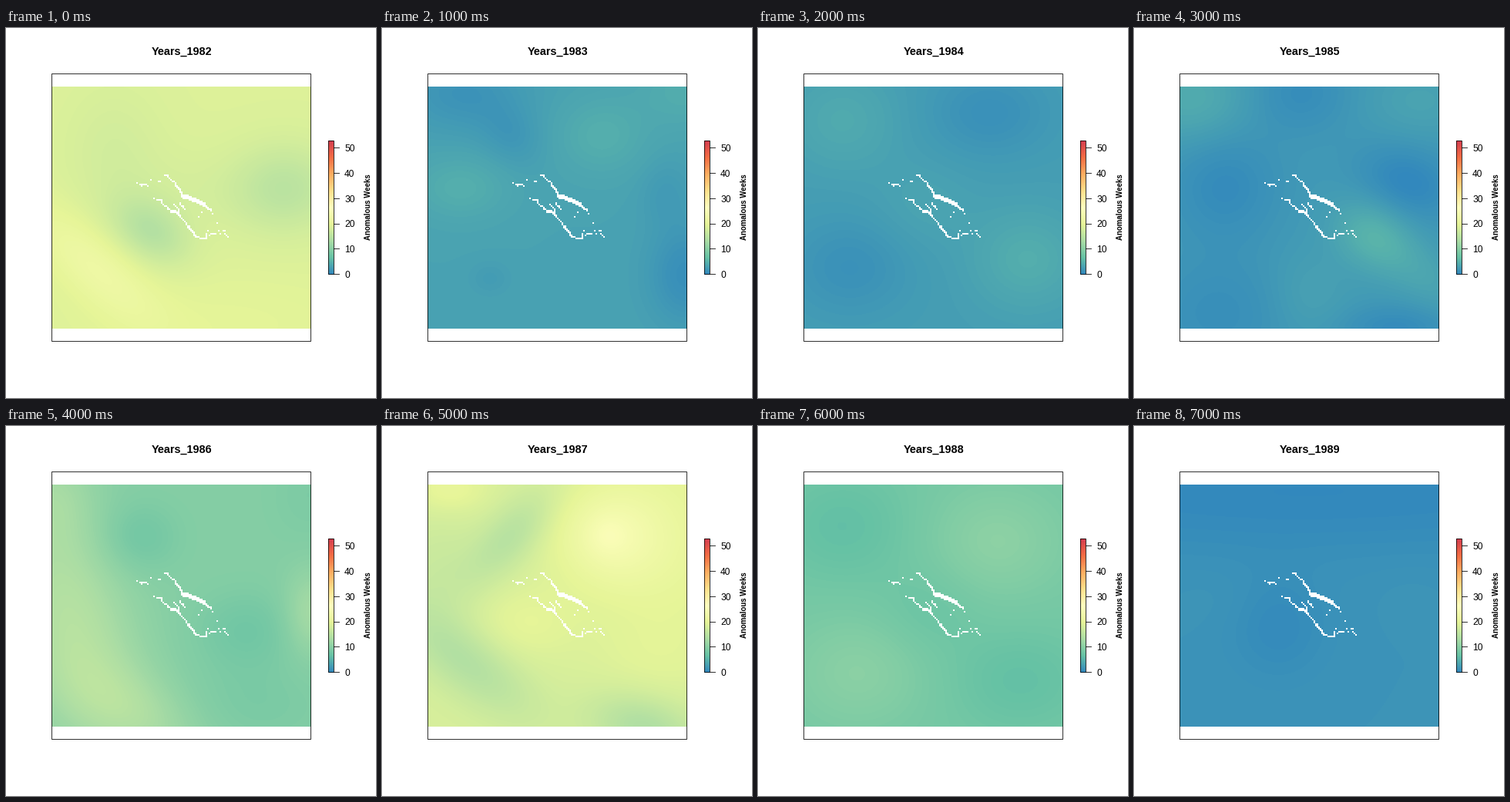
A matplotlib script for the animation above (8 s loop, 480 by 480 pixels).

```python
import numpy as np
import matplotlib.pyplot as plt
from matplotlib.animation import FuncAnimation
from matplotlib.colors import LinearSegmentedColormap
from matplotlib.patches import Rectangle

DPI = 72
SIZE = 480
LEFT, RIGHT, TOP, BOTTOM = 59, 396, 76, 390
MAX_WEEKS = 53
FIRST_YEAR = 1982

palette = LinearSegmentedColormap.from_list("weeks", [
    "#3288BD", "#66C2A5", "#ABDDA4", "#E6F598", "#FFFFBF",
    "#FEE08B", "#FDAE61", "#F46D43", "#D53E4F"], N=256)

X, Y = np.meshgrid(np.arange(LEFT, RIGHT) + 0.5, np.arange(TOP, BOTTOM) + 0.5)


def bump(x, y, rx, ry, height, tilt=0):
    """Tilted Gaussian hill; tilt in degrees, clockwise on screen."""
    c, s = np.cos(np.radians(tilt)), np.sin(np.radians(tilt))
    u = ((X - x) * c + (Y - y) * s) / rx
    v = ((Y - y) * c - (X - x) * s) / ry
    return height * np.exp(-(u * u + v * v) / 2)


# Weeks per year: a base level plus hills and hollows
fields = [
    18.9 + bump(188, 264, 38, 26, -4.2, 35) + bump(362, 208, 48, 40, -3.8)
    + bump(115, 310, 75, 28, 3.1, 42) + bump(140, 160, 45, 60, -1.3)
    + bump(280, 385, 130, 45, 0.9) + bump(235, 215, 60, 40, -0.8),

    3.1 + bump(105, 85, 55, 35, -1.7) + bump(168, 140, 30, 25, -1.2, 45)
    + bump(285, 140, 42, 36, 1.4) + bump(102, 207, 44, 30, 1.4)
    + bump(394, 320, 34, 45, -2.2) + bump(140, 325, 18, 15, -0.7)
    + bump(395, 80, 45, 35, 1.2) + bump(368, 215, 22, 30, -0.9),

    2.6 + bump(110, 120, 50, 45, 1.4) + bump(300, 110, 55, 40, -1.5)
    + bump(350, 300, 50, 45, 1.8) + bump(120, 310, 55, 45, -1.4)
    + bump(215, 230, 45, 40, 0.7),

    2.1 + bump(75, 92, 52, 40, 2.1) + bump(215, 85, 45, 35, -1.4)
    + bump(370, 95, 50, 35, 1.1) + bump(118, 205, 48, 50, -1.6)
    + bump(355, 200, 45, 32, -2.1, 20) + bump(310, 270, 38, 30, 2.8, 35)
    + bump(375, 320, 45, 25, 1.2, 40) + bump(340, 388, 50, 20, -1.6)
    + bump(110, 370, 60, 50, -1.2) + bump(230, 345, 35, 40, 0.9),

    9.7 + bump(85, 255, 55, 110, 4.8, -15) + bump(165, 370, 70, 38, 3.2, 30)
    + bump(398, 243, 25, 38, 3.3) + bump(312, 265, 45, 35, -1.9)
    + bump(172, 145, 35, 32, -2) + bump(65, 90, 35, 45, 2)
    + bump(320, 360, 70, 40, -1) + bump(392, 90, 35, 45, -0.8),

    18.2 + bump(293, 142, 48, 46, 4.6) + bump(293, 142, 16, 16, 1.2)
    + bump(370, 150, 65, 95, 2.3)
    + bump(88, 82, 32, 20, 2.4) + bump(168, 142, 52, 24, -3.5, -48)
    + bump(108, 305, 75, 30, -4, 38) + bump(187, 255, 45, 32, 1.7)
    + bump(340, 390, 50, 28, -4.4, 15) + bump(75, 190, 40, 50, -1.6)
    + bump(355, 300, 60, 35, 0.8),

    8.2 + bump(110, 130, 60, 50, -1.8) + bump(310, 150, 60, 50, 2.2)
    + bump(130, 320, 60, 50, 2) + bump(340, 330, 60, 45, -1.7)
    + bump(220, 240, 45, 40, -1),

    1.45 + bump(227, 85, 420, 58, -1.25) + bump(187, 262, 44, 46, -1)
    + bump(105, 225, 40, 28, 0.18) + bump(360, 215, 35, 28, 0.15)
    + bump(75, 385, 35, 20, -0.2),
]

land = np.zeros(X.shape, bool)


def coast(points, width=2):
    """Mark 2-pixel land cells along a polyline."""
    pts = np.array(points, float)
    for a, b in zip(pts, pts[1:] if len(pts) > 1 else pts):
        steps = int(np.abs(b - a).max() // 2) + 1
        for t in np.linspace(0, 1, steps + 1):
            x, y = a + (b - a) * t
            col = int((x - LEFT) // 2) * 2
            row = int((y - width / 2 + 1 - TOP) // 2) * 2
            land[row:row + width, col:col + 2] = True


# northern island
coast([(205, 190), (209, 191), (214, 197), (219, 201)])
coast([(219, 202), (224, 207), (227, 213), (228, 217)], 4)
coast([(227, 217), (234, 219), (242, 222), (249, 225), (257, 229)], 6)
coast([(257, 229), (262, 233)], 4)
coast([(264, 234), (266, 237)])
# southern island chain
coast([(196, 222), (202, 223), (203, 228), (209, 233), (213, 236)])
coast([(213, 237), (222, 239), (225, 243)], 4)
coast([(225, 244), (231, 250), (236, 256)])
coast([(236, 257), (241, 263), (246, 269)], 4)
coast([(246, 271), (252, 272), (260, 272)])
# inner ridges
coast([(218, 229), (223, 234), (224, 236)])
coast([(225, 227), (232, 235)])
# western islets
coast([(173, 203), (181, 203)])
coast([(198, 198), (200, 198)])
# eastern islets
coast([(259, 266), (259, 270)])
coast([(264, 268), (271, 267)])
coast([(281, 263), (284, 263)])
coast([(284, 267), (288, 271)])
for islet in [(170, 201), (175, 205), (183, 205), (187, 197), (192, 220),
              (253, 239), (250, 244), (268, 241), (273, 252), (261, 263),
              (275, 262), (277, 267)]:
    coast([islet])


def render(field):
    rgb = palette(np.clip(field, 0, MAX_WEEKS) / MAX_WEEKS)[..., :3]
    rgb[land] = 1
    return rgb


pictures = [render(f) for f in fields]

plt.rcParams["font.family"] = "Liberation Sans"
fig = plt.figure(figsize=(SIZE / DPI, SIZE / DPI), dpi=DPI, facecolor="white")
ax = fig.add_axes([0, 0, 1, 1])


def frame_box(x0, y0, x1, y1):
    ax.add_patch(Rectangle((x0, y0), x1 - x0, y1 - y0, fill=False,
                           ec="black", lw=0.8, zorder=3))


chart = ax.imshow(pictures[0], extent=(LEFT, RIGHT, BOTTOM, TOP),
                  interpolation="nearest")
frame_box(59.1, 59.1, 395.1, 406.1)

# colour scale
ax.imshow(np.linspace(1, 0, 174)[:, None], cmap=palette, aspect="auto",
          extent=(418, 425, 320, 146), interpolation="nearest")
frame_box(418.1, 146.1, 425.1, 319.1)
for weeks in range(0, 51, 10):
    y = 319.2 - weeks * 3.275
    ax.plot([425, 432], [y, y], color="black", lw=0.8)
    ax.text(439, y + 4.6, str(weeks), size=12, va="baseline")
ax.text(473, 232.5, "Anomalous Weeks", size=9.6, weight="bold", rotation=90,
        rotation_mode="anchor", ha="center", va="baseline")
title = ax.text(228, 35, "", size=14.4, weight="bold",
                ha="center", va="baseline")

ax.set(xlim=(0, SIZE), ylim=(SIZE, 0), aspect="auto")
ax.axis("off")


def update(i):
    chart.set_data(pictures[i])
    title.set_text(f"Years_{FIRST_YEAR + i}")
    return chart, title


anim = FuncAnimation(fig, update, frames=len(pictures), interval=1000,
                     repeat=True, repeat_delay=0)
plt.show()
```
